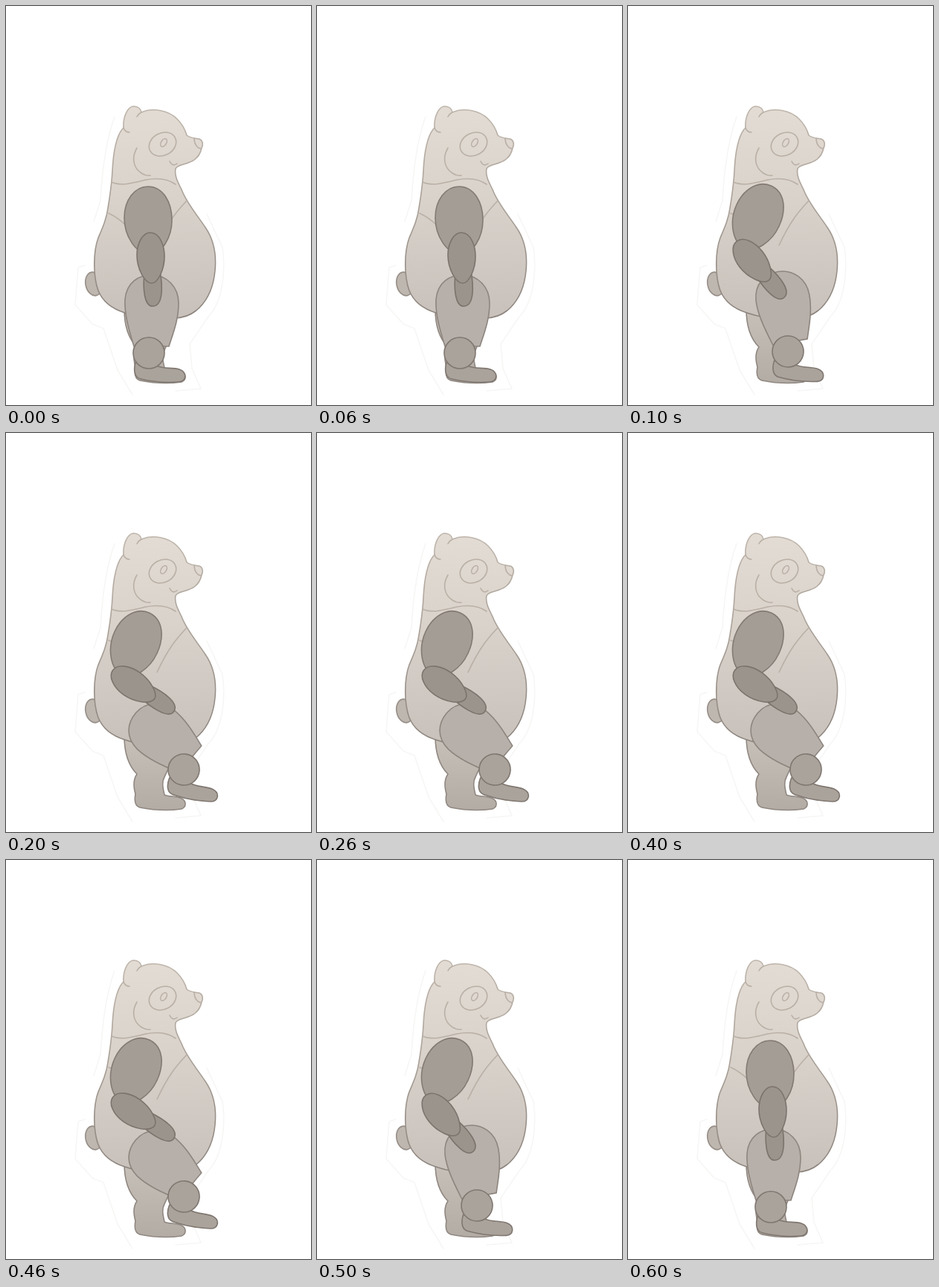
These frames come from a looping animation (410 px wide and 537 px high, 700 ms). An HTML page:

```html
<!DOCTYPE html>
<html lang="en">
<head>
<meta charset="utf-8">
<title>Marching panda</title>
<style>
  html, body { margin: 0; width: 100%; height: 100%; overflow: hidden; background: #fff; }
  svg { display: block; width: 100%; height: 100%; }
  path, ellipse, circle { stroke-width: 1.6; stroke-linecap: round; stroke-linejoin: round; }
  .edge { fill: none; stroke: #f6f6f5; }
  .sketch { fill: none; stroke: #b9b0a6; stroke-width: 1.4; }
  .coat { fill: url(#coat); stroke: url(#pencil); }
  .leg { fill: url(#leg); stroke: #8f8780; }
  .thigh { fill: #b7b0aa; stroke: #8d857e; }
  .foot { fill: #aaa39c; stroke: #7f7770; }
  .arm { fill: #a49d96; stroke: #827a73; }
  .hand { fill: #9b948d; stroke: #7b736c; }
</style>
</head>
<body>
<svg viewBox="0 0 410 537">
  <defs>
    <linearGradient id="coat" gradientUnits="userSpaceOnUse" x1="0" y1="135" x2="0" y2="420">
      <stop offset="0" stop-color="#e3dcd4"/>
      <stop offset=".45" stop-color="#d9d2cb"/>
      <stop offset="1" stop-color="#c8c1bb"/>
    </linearGradient>
    <linearGradient id="pencil" gradientUnits="userSpaceOnUse" x1="0" y1="135" x2="0" y2="420">
      <stop offset="0" stop-color="#bfb6ac"/>
      <stop offset=".5" stop-color="#a79f96"/>
      <stop offset="1" stop-color="#8a827b"/>
    </linearGradient>
    <linearGradient id="leg" gradientUnits="userSpaceOnUse" x1="0" y1="415" x2="0" y2="507">
      <stop offset="0" stop-color="#c6bfb8"/>
      <stop offset="1" stop-color="#b3aca5"/>
    </linearGradient>
  </defs>

  <!-- cut-out paper edge -->
  <path class="edge" d="M146 149C133 185 129 225 127 262L118 290M106 349L97 352L93 402L116 428L131 434L150 490L170 523M228 518L262 515L250 488L247 455L272 418C290 400 296 360 291 325L270 280"/>

  <!-- standing leg, tail and torso -->
  <path class="leg" d="M159 408C159 430 165 448 176 459C170 468 172 478 174 486C172 496 174 502 180 504C200 508 222 508 236 506C243 503 243 494 234 491C226 488 219 490 213 487C211 478 209 470 213 463C220 448 227 434 229 414Z"/>
  <ellipse cx="118" cy="374" rx="11" ry="16" transform="rotate(-12 118 374)" fill="#beb7b0" stroke="#978f88"/>
  <path class="coat" d="M158 164C157 150 163 136 171 135C177 135 181 138 182 143C198 136 219 141 230 152C238 160 241 167 243 174C248 178 254 178 260 179C265 181 265 187 263 191C261 201 254 208 245 211C238 214 230 214 228 219C226 228 231 237 236 247C242 264 256 280 268 298C279 314 283 335 281 356C279 378 272 394 260 406C250 416 240 420 226 420C202 422 180 420 160 413C144 408 130 398 124 383C117 364 117 331 124 312C130 298 135 287 137 272C140 254 142 240 143 222C144 201 147 178 156 166Z"/>

  <!-- face and seams -->
  <g class="sketch">
    <path d="M158 164Q160 170 166 170M182 143Q178 145 176 149"/>
    <ellipse cx="210.500" cy="186" rx="19" ry="15" transform="rotate(-28 210.500 186)"/>
    <ellipse cx="212" cy="184" rx="3.500" ry="6" transform="rotate(32 212 184)"/>
    <path d="M176 191C169 203 170 217 182 225Q188 229 194 228"/>
    <path d="M220 209Q224 217 230 212"/>
    <path d="M253 178Q253 187 259 191L262 192"/>
    <path d="M142 237C155 243 172 238 188 234C203 231 218 233 228 240"/>
    <path d="M138 279Q149 284 160 294"/>
    <path d="M243 262C230 276 219 288 203 322"/>
  </g>

  <g id="thigh">
    <path class="thigh" d="M-24 60C-32 34 -37 15 -36 -3C-34 -26 -18 -36 0 -36C20 -36 36 -20 36 2C36 25 28 44 23 60Z"/>
  </g>
  <g id="shin">
    <path class="foot" d="M-18 13C-21 24 -19 33 -11 35C6 39 26 40 40 39C51 38 52 26 41 22C31 19 20 22 10 17Z"/>
    <circle class="foot" r="21"/>
  </g>
  <g id="arm">
    <path class="arm" d="M0 -45C20 -45 32 -24 32 0C32 24 18 46 2 46C-16 46 -32 22 -32 -3C-32 -27 -18 -45 0 -45Z"/>
  </g>
  <g id="forearm">
    <path class="hand" d="M-8 36C-10 54 -9 81 3 81C17 81 17 56 13 34Z"/>
    <path class="hand" d="M0 -18C13 -18 19 0 19 14C19 32 10 50 2 50C-8 50 -18 30 -18 12C-18 -4 -10 -18 0 -18Z"/>
  </g>
</svg>
<script>
  // Joint x, y and angle for each key pose, from standing to knee raised.
  const limbs = {
    thigh: [[196, 398, 0], [208, 393, -10], [202, 400, -50], [208, 390, -52]],
    shin: [[192, 467, 0], [215, 465, 2], [239, 453, 6], [253, 435, 13]],
    arm: [[191, 288, 0], [174, 283, 25], [174, 283, 25], [173, 283, 26]],
    forearm: [[194, 323, 0], [157, 331, -38], [158, 330, -54], [157, 327, -74]]
  };
  const STEP = 100, STEPS = 7;

  function draw(now) {
    const step = Math.floor(now / STEP) % STEPS;
    const pose = Math.min(step, STEPS - 1 - step);
    for (const id in limbs) {
      const [x, y, angle] = limbs[id][pose];
      document.getElementById(id).setAttribute("transform", `translate(${x} ${y}) rotate(${angle})`);
    }
  }

  const start = performance.now();
  function tick() {
    draw(performance.now() - start);
    requestAnimationFrame(tick);
  }
  tick();
</script>
</body>
</html>
```
